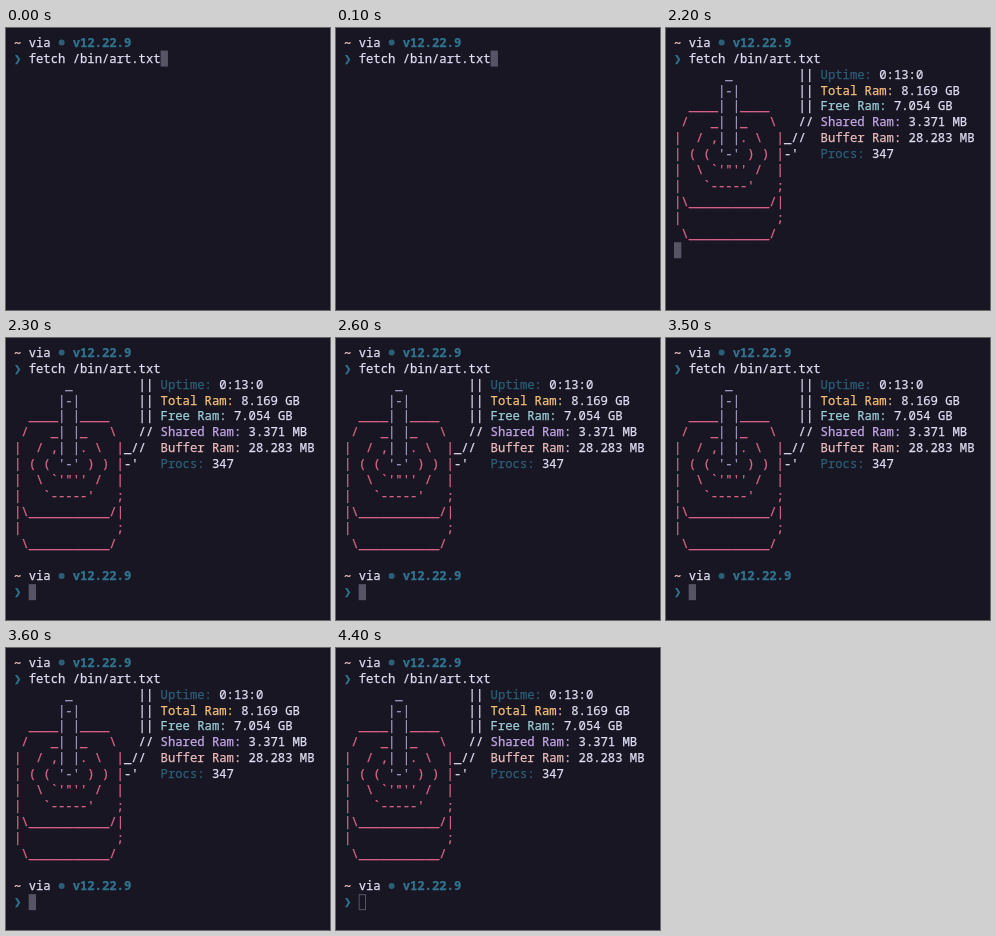
Recreate the animation shown at these times as an HTML page. Size 324 by 282 pixels, loop 4.5 s.

```html
<!DOCTYPE html>
<html lang="en">
<head>
<meta charset="utf-8">
<title>Terminal</title>
<style>
  html, body { margin: 0; width: 100%; height: 100%; overflow: hidden; background: #181623; }
  svg { display: block; width: 100vw; height: 100vh; }
  text {
    font: 500 12.22px "Noto Sans Mono", "DejaVu Sans Mono", monospace;
    white-space: pre; font-variant-ligatures: none; stroke-width: 0.25px;
  }
  .bold { font-weight: 700; }
  .arrow { font-family: "DejaVu Sans Mono", monospace; }
</style>
</head>
<body>
<svg id="stage" viewBox="0 0 324 282"></svg>
<script>
const LOOP = 4500, OUTPUT_AT = 2200, PROMPT_AT = 2300, BLUR_AT = 4400;
const CELL = 7.33, LINE = 15.97, LEFT = 8, BASE = 18.6;
const C = {
  text: '#e0def4', love: '#e0668a', gold: '#f6c177', rose: '#ebbcba',
  pine: '#31748f', dim: '#2b5f77', foam: '#9ccfd8', iris: '#c4a7e7',
  stem: '#a69cc6', cursor: '#575466'
};
const stage = document.getElementById('stage');

function set(el, attrs) {
  for (const key in attrs) el.setAttribute(key, attrs[key]);
}

function add(parent, tag, attrs = {}) {
  const el = document.createElementNS('http://www.w3.org/2000/svg', tag);
  set(el, attrs);
  return parent.appendChild(el);
}

const colX = col => LEFT + col * CELL;
const rowY = row => BASE + row * LINE;

function write(parent, col, row, str, fill, cls = '') {
  const attrs = { x: colX(col), y: rowY(row), fill, stroke: fill, class: cls };
  add(parent, 'text', attrs).textContent = str;
}

// Each run of non-blank characters is placed on the character grid.
function writeArt(parent, lines, fill) {
  lines.forEach((line, i) => {
    for (const run of line.matchAll(/\S+/g)) write(parent, run.index, i + 2, run[0], fill);
  });
}

function prompt(parent, row) {
  write(parent, 0, row, '~', C.rose, 'bold');
  write(parent, 2, row, 'via', C.text);
  add(parent, 'circle', { cx: colX(6.5), cy: rowY(row) - 4.2, r: 3, fill: C.dim });
  write(parent, 8, row, 'v12.22.9', C.pine, 'bold');
  write(parent, 0, row + 1, '❯', C.pine, 'arrow');
}

const body = [
  '',
  '',
  '  ____     ____',
  ' /   _   _   \\',
  '|  / ,   . \\  |',
  '| ( (     ) ) |',
  '|  \\ `\'"\'\' /  |',
  "|   `-----'   ;",
  '|\\___________/|',
  '|             ;',
  ' \\___________/'
];
body[2] = '  ____   ____';

const stem = [
  '       _',
  '      |-|',
  '      | |',
  '      | |',
  '      | |',
  "      '-'"
];

const pipe = [
  '                 ||',
  '                 ||',
  '                 ||',
  '                 //',
  '               _//',
  "               -'"
];

const stats = [
  ['Uptime:', '0:13:0', C.dim],
  ['Total Ram:', '8.169 GB', C.gold],
  ['Free Ram:', '7.054 GB', C.foam],
  ['Shared Ram:', '3.371 MB', C.iris],
  ['Buffer Ram:', '28.283 MB', C.rose],
  ['Procs:', '347', C.dim]
];

add(stage, 'rect', { width: 324, height: 282, fill: '#181623' });
const cursor = add(stage, 'rect');
prompt(stage, 0);
write(stage, 2, 1, 'fetch /bin/art.txt', C.text);

const output = add(stage, 'g');
writeArt(output, body, C.love);
writeArt(output, stem, C.stem);
writeArt(output, pipe, C.text);
stats.forEach(([label, value, fill], i) => {
  write(output, 20, i + 2, label, fill);
  write(output, 21 + label.length, i + 2, value, C.text);
});

const nextPrompt = add(stage, 'g');
prompt(nextPrompt, 14);

function placeCursor(col, row, hollow) {
  const inset = hollow ? 0.5 : 0;
  set(cursor, {
    x: colX(col) + inset, y: 22.6 + (row - 1) * LINE + inset,
    width: CELL - 2 * inset, height: 16 - 2 * inset,
    fill: hollow ? 'none' : C.cursor, stroke: hollow ? C.cursor : 'none'
  });
}

function render(t) {
  output.style.display = t >= OUTPUT_AT ? '' : 'none';
  nextPrompt.style.display = t >= PROMPT_AT ? '' : 'none';
  if (t < OUTPUT_AT) placeCursor(20, 1, false);
  else if (t < PROMPT_AT) placeCursor(0, 13, false);
  else placeCursor(2, 15, t >= BLUR_AT);
}

const start = performance.now();
function tick() {
  render((performance.now() - start) % LOOP);
  requestAnimationFrame(tick);
}
tick();
</script>
</body>
</html>
```
